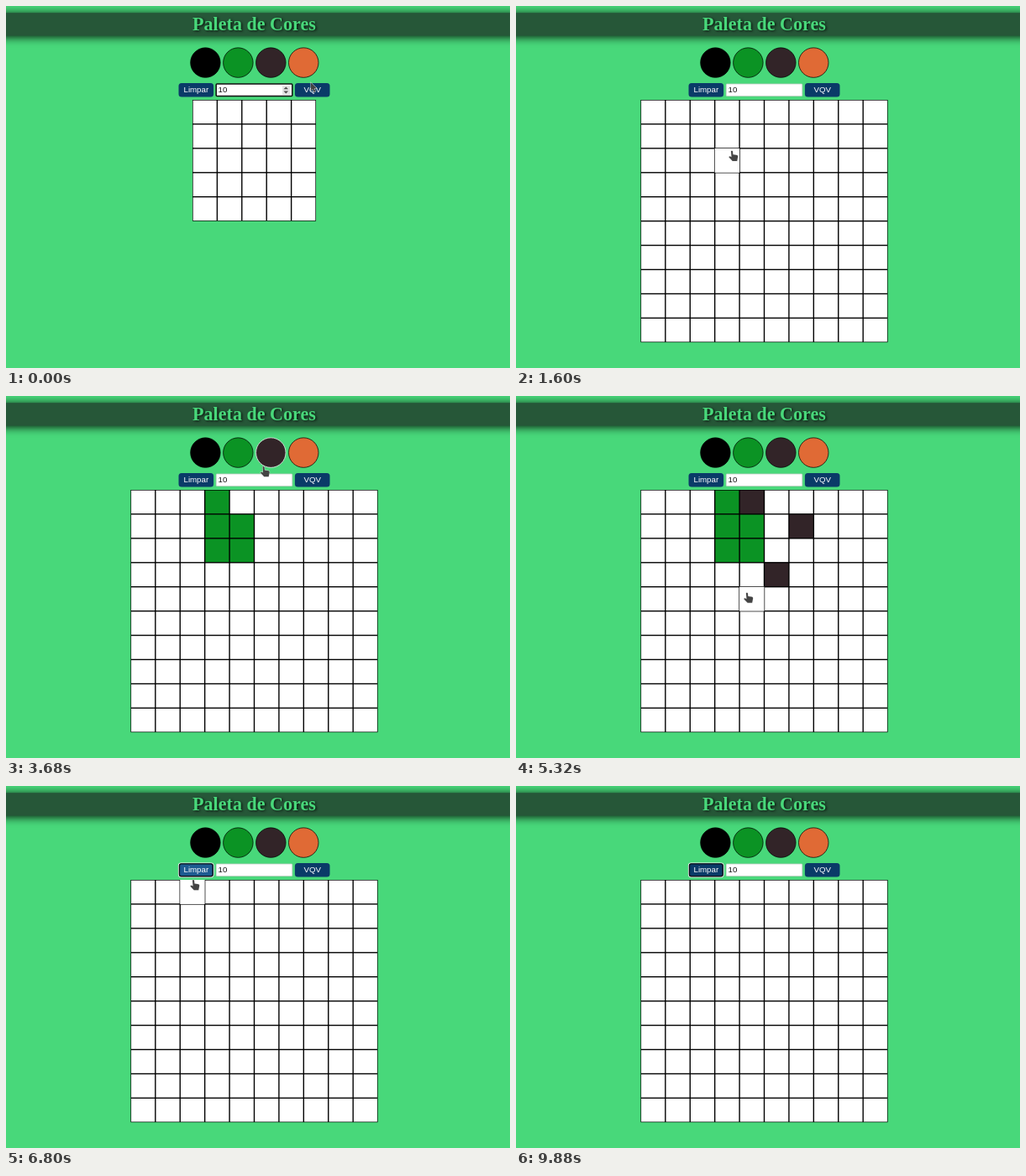
Write an HTML page with a canvas that moves like this. It is 600 px wide and 432 px high and loops after 10000 ms.

```html
<!DOCTYPE html>
<html lang="pt">
<head>
<meta charset="utf-8">
<title>Paleta de Cores</title>
<style>
html, body { margin: 0; width: 100%; height: 100%; overflow: hidden; background: #48d87a; }
canvas { display: block; }
</style>
</head>
<body>
<canvas id="stage" width="600" height="432"></canvas>
<script>
const ctx = document.getElementById('stage').getContext('2d');
const LOOP = 10000, RESIZE = 200, CLEAR = 6520, LEAVE = 8320;
const PAGE = '#48d87a', GREEN = '#0b9324', DARK = '#322428';
const CELL_W = 29.42, CELL_H = 28.93, TOP = 112, MIDDLE = 295.5;
const gridLeft = n => MIDDLE - n * CELL_W / 2;

const swatches = ['#000', GREEN, DARK, '#e06a35'].map((color, i) => ({ color, x: 237.4 + 38.95 * i, y: 67.6 }));

// The pointer's stops, and the cells it paints on the way
const route = [], painted = [];

function go(t, x, y, stay = 0) {
  route.push({ t, x, y });
  if (stay) route.push({ t: t + stay, x, y });
}

function paint(cells, start, gap, color, fx, fy) {
  cells.split(' ').forEach(([c, r], i) => {
    const t = start + i * gap;
    go(t, gridLeft(10) + (+c + fx) * CELL_W, TOP + (+r + fy) * CELL_H, 140);
    painted.push({ t: t + 120, c: +c, r: +r, color });
  });
}

go(0, 363, 91.5, 480);
go(1040, 280, 71, 160);
paint('32 31 30 41 42', 1600, 300, GREEN, 0.69, 0.1);
go(3680, 306.5, 84, 80);
paint('40 61 53 44', 4000, 440, DARK, 0.3, 0.24);
go(5900, 302, 80);
go(6320, 224, 99, 240);
go(6800, 223, 112);
go(7100, 181, 82);
go(7500, 236, 20);
go(LEAVE, 517, 174);

function pointerAt(t) {
  if (t >= LEAVE) return null;
  const i = route.findIndex(p => p.t > t), a = route[i - 1], b = route[i];
  const u = (t - a.t) / (b.t - a.t), k = u * u * (3 - 2 * u);
  return { x: a.x + (b.x - a.x) * k, y: a.y + (b.y - a.y) * k };
}

function box(x, y, w, h, r, fill, stroke, line = 1) {
  ctx.beginPath();
  ctx.roundRect(x, y, w, h, r);
  if (fill) { ctx.fillStyle = fill; ctx.fill(); }
  if (stroke) { ctx.strokeStyle = stroke; ctx.lineWidth = line; ctx.stroke(); }
}

function label(text, x, color, align = 'center') {
  ctx.font = '9.7px "Liberation Sans", Arial, sans-serif';
  ctx.textAlign = align;
  ctx.fillStyle = color;
  ctx.fillText(text, x, 103.2);
}

function drawHeader() {
  ctx.save();
  ctx.shadowColor = '#06120a';
  ctx.shadowBlur = 11;
  ctx.shadowOffsetY = 1.4;
  ctx.fillStyle = '#265738';
  ctx.fillRect(-20, 8.2, 640, 27.2);
  ctx.restore();
  ctx.save();
  ctx.font = 'bold 22.1px "Liberation Serif", "Times New Roman", serif';
  ctx.textAlign = 'center';
  ctx.shadowColor = 'rgba(0,0,0,.75)';
  ctx.shadowBlur = 3;
  ctx.shadowOffsetX = ctx.shadowOffsetY = 1.4;
  ctx.fillStyle = PAGE;
  ctx.fillText('Paleta de Cores', MIDDLE, 28.5);
  ctx.restore();
}

function drawSwatch({ color, x, y }, hover) {
  ctx.beginPath();
  ctx.arc(x, y, 17.75, 0, 7);
  ctx.fillStyle = color;
  ctx.fill();
  ctx.strokeStyle = hover ? '#fff' : '#000';
  ctx.lineWidth = 0.72;
  ctx.stroke();
}

function drawButton(text, x, w, hover, focus) {
  box(x, 92, w, 16.6, 3.5, hover ? '#1d5b91' : '#0a3b68');
  if (focus) {
    box(x, 92, w, 16.6, 3, null, '#fff', 1.2);
    box(x + 0.9, 92.9, w - 1.8, 14.8, 2.2, null, '#0b1018', 1.4);
  }
  label(text, x + w / 2, '#fff');
}

function drawInput(focus) {
  box(250.2, 93, 90.6, 14.6, 1, '#fff', focus ? '#101010' : '#bccbc1', focus ? 1.5 : 0.8);
  label('10', 252.6, '#111', 'left');
  if (!focus) return;
  ctx.fillStyle = '#e4e4e4';
  ctx.fillRect(329, 95, 9, 11);
  ctx.fillStyle = '#4d4d4d';
  for (const dir of [-1, 1]) {
    ctx.beginPath();
    ctx.moveTo(330.5, 100.4 + dir * 1.2);
    ctx.lineTo(333.3, 100.4 + dir * 4);
    ctx.lineTo(336.1, 100.4 + dir * 1.2);
    ctx.fill();
  }
}

function drawGrid(n, t, p) {
  const left = gridLeft(n), line = 0.7;
  let hand = false;
  ctx.fillStyle = '#000';
  ctx.fillRect(left, TOP, n * CELL_W, n * CELL_H);
  for (let r = 0; r < n; r++) for (let c = 0; c < n; c++) {
    const x = left + c * CELL_W, y = TOP + r * CELL_H;
    const hover = p && p.x >= x && p.x < x + CELL_W && p.y >= y && p.y < y + CELL_H;
    const hit = t < CLEAR && painted.find(s => s.t <= t && s.c === c && s.r === r);
    if (hover) {
      hand = true;
      ctx.fillStyle = '#fff';
      ctx.fillRect(x, y, CELL_W, CELL_H);
    }
    ctx.fillStyle = hit ? hit.color : '#fff';
    ctx.fillRect(x + line, y + line, CELL_W - 2 * line, CELL_H - 2 * line);
  }
  return hand;
}

const arrowShape = new Path2D('M0 0V9.4L2.1 7.5 3.8 11.2 5.5 10.4 3.9 6.9 6.8 6.7Z');
const handShape = new Path2D('M-1 .6Q0-.6 1 .6L1.4 4.4 6.2 5.2Q7.4 5.6 7.2 7L6.2 12.2H.8L-3.4 7.8Q-3.4 6.2-2 6.8L-.4 7.6Z');

function drawPointer({ x, y }, hand) {
  const shape = hand ? handShape : arrowShape;
  ctx.save();
  ctx.translate(x, y);
  ctx.strokeStyle = 'rgba(225,225,225,.75)';
  ctx.lineWidth = 1.1;
  ctx.stroke(shape);
  ctx.fillStyle = '#444';
  ctx.fill(shape);
  ctx.restore();
}

function draw(t) {
  const p = pointerAt(t);
  ctx.fillStyle = PAGE;
  ctx.fillRect(0, 0, 600, 432);
  drawHeader();
  let hand = false;
  for (const s of swatches) {
    const hover = p && Math.hypot(p.x - s.x, p.y - s.y) < 19.6;
    drawSwatch(s, hover);
    hand ||= hover;
  }
  drawButton('Limpar', 205.5, 41.6, t >= 6240 && t < 6920, t >= CLEAR);
  drawInput(t < RESIZE);
  drawButton('VQV', 343.9, 41.6, false, t >= RESIZE && t < 1160);
  hand = drawGrid(t < RESIZE ? 5 : 10, t, p) || hand;
  if (p) drawPointer(p, hand);
}

// Motion advances 15 times a second, on a 40 ms raster
function tick() {
  const step = Math.floor((performance.now() % LOOP + 20) * 0.015);
  draw(Math.round(step * 5 / 3) * 40 % LOOP);
  requestAnimationFrame(tick);
}
tick();
</script>
</body>
</html>
```
